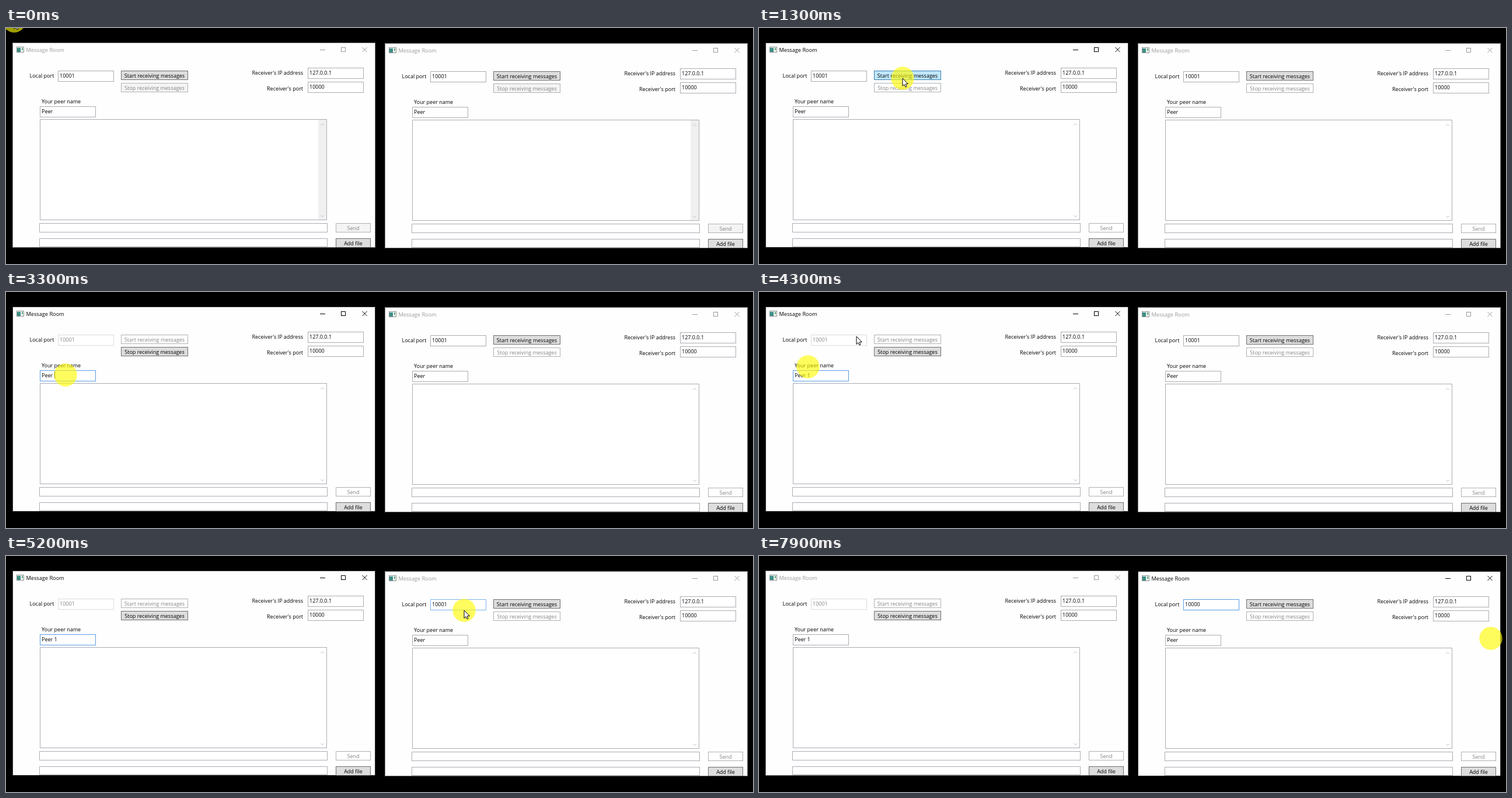
Animation, 1280 px wide and 404 px high, one loop 8000 ms. Source, as an HTML page with a canvas:

```html
<!DOCTYPE html>
<html lang="en">
<head>
<meta charset="utf-8">
<title>Message Room</title>
<style>
html, body { margin: 0; width: 100%; height: 100%; overflow: hidden; background: #000; }
canvas { display: block; }
</style>
</head>
<body>
<canvas id="stage" width="1280" height="404"></canvas>
<script>
const ctx = document.getElementById('stage').getContext('2d');
const LOOP = 8000, STEP = 100;
const GREY = '#838383', EDGE = '#abadb3', HOVER = '#7eb4ea', FOCUS = '#569de5';

// pointer stops: time, x, y
const path = [
  [0, 14, -12], [100, 14, -12], [700, 246, 86], [1500, 246, 86], [2100, 104, 142],
  [2400, 104, 142], [2600, 102, 142], [4000, 102, 142], [4100, 70, 135], [4200, 84, 128],
  [4300, 167, 76], [4500, 167, 76], [5100, 785, 93], [5200, 785, 93], [5300, 780, 87],
  [7700, 780, 87], [7800, 1254, 141], [7900, 1310, 150], [8000, 1310, 150]
];

function pointerAt(t) {
  const i = Math.max(1, path.findIndex(p => p[0] >= t));
  const [t0, x0, y0] = path[i - 1], [t1, x1, y1] = path[i];
  const u = Math.max(0, (t - t0) / (t1 - t0)), e = u * u * (3 - 2 * u);
  return [x0 + (x1 - x0) * e, y0 + (y1 - y0) * e];
}

const within = (t, ...spans) => spans.some(([a, b]) => t >= a && t < b);

function rect(x, y, w, h, fill, edge) {
  ctx.fillStyle = fill;
  ctx.fillRect(x, y, w, h);
  if (edge) {
    ctx.strokeStyle = edge;
    ctx.strokeRect(x + .5, y + .5, w - 1, h - 1);
  }
}

function text(s, x, y, color = '#000', align = 'left', size = 9) {
  ctx.font = size + 'px "Open Sans", "Noto Sans", sans-serif';
  ctx.textAlign = align;
  ctx.fillStyle = color;
  ctx.fillText(s, x, y);
}

function line(color, ...pts) {
  ctx.strokeStyle = color;
  ctx.beginPath();
  pts.forEach(([x, y]) => ctx.lineTo(x, y));
  ctx.stroke();
}

function drawWindow(ox, oy, s) {
  const [px, py] = [s.pointer[0] - ox, s.pointer[1] - oy];
  const over = (x, y, w, h) => px >= x && px <= x + w && py >= y && py <= y + h;

  function button(label, x, y, w, on) {
    const hot = on && over(x, y, w, 16);
    rect(x, y, w, 16, hot ? '#bee6fd' : on ? '#ddd' : s.early ? '#f4f4f4' : '#fff',
      hot ? '#3c7fb1' : on ? '#707070' : '#adb2b5');
    text(label, x + w / 2, y + 12, on ? '#000' : GREY, 'center');
  }

  function field(value, x, y, base, o = {}) {
    const edge = o.off ? '#d9dbde' : o.focus ? FOCUS : over(x, y, 95, 19) ? HOVER : EDGE;
    rect(x, y, 96, 19, '#fff', edge);
    text(value, x + 3, base, o.off ? GREY : '#000');
    if (o.caret) {
      const cx = Math.round(x + 3 + ctx.measureText(value).width);
      rect(cx, y + 2, 1, 12, '#000');
    }
  }

  ctx.save();
  ctx.translate(ox, oy);
  rect(11, 25, 622, 351, '#fefefe', s.active ? '#383838' : '#888');

  rect(18, 32, 13, 10, '#f4f4f4', '#8a9296');
  rect(19, 34, 6, 7, '#3f8f86');
  rect(27, 34, 2, 4, '#5aa67c');
  const ink = s.active ? '#000' : '#999';
  text('Message Room', 34.5, 41, ink, 'left', 9.2);
  line(ink, [538, 37.5], [547, 37.5]);
  ctx.strokeRect(574.5, 33.5, 7, 7);
  line(ink, [610.5, 33], [618.5, 41]);
  line(ink, [618.5, 33], [610.5, 41]);

  text('Local port', 40.5, 85);
  text("Receiver's IP address", 509, 79.5, '#000', 'right');
  text("Receiver's port", 509, 106.5, '#000', 'right');
  text('Your peer name', 61, 128.5);
  field(s.port, 89, 73, 85, { off: s.started, focus: s.portFocus, caret: s.portCaret });
  field('127.0.0.1', 517, 68, 79.5);
  field('10000', 517, 92, 103.5);
  field(s.name, 58, 134, 146, { focus: s.nameFocus, caret: s.nameCaret });
  button('Start receiving messages', 197, 73, 115, !s.started);
  button('Stop receiving messages', 197, 94, 115, s.started);

  rect(58, 156, 492, 173, '#fff', EDGE);
  if (s.early) rect(535, 157, 14, 171, '#f0f0f0');
  line('#c0c0c0', [539, 166.5], [542, 163.5], [545, 166.5]);
  line('#c0c0c0', [539, 320.5], [542, 323.5], [545, 320.5]);
  rect(57, 334, 494, 16, '#fff', EDGE);
  rect(57, 360, 494, 15, '#fff', EDGE);
  button('Send', 565, 334, 60, false);
  button('Add file', 565, 360, 60, true);
  ctx.restore();
}

function drawPointer(x, y, beam) {
  if (beam) {
    const pale = 'rgba(255,255,255,.6)';
    line(pale, [x + .5, y - 6], [x + .5, y + 7]);
    line(pale, [x - 2, y - 6.5], [x + 3, y - 6.5]);
    line(pale, [x - 2, y + 7.5], [x + 3, y + 7.5]);
    return;
  }
  const shape = [[0, 0], [0, 13.5], [3, 10.7], [5, 15], [7, 14], [5.2, 9.8], [9.3, 9.6]];
  ctx.beginPath();
  shape.forEach(([dx, dy]) => ctx.lineTo(x + dx, y + dy));
  ctx.closePath();
  ctx.fillStyle = '#fff';
  ctx.strokeStyle = '#000';
  ctx.fill();
  ctx.stroke();
}

function draw(t) {
  const pointer = pointerAt(t), halo = pointerAt(Math.max(0, t - STEP));
  const early = t < 200, second = t >= 5600;
  rect(0, 0, 1280, 404, '#000');

  drawWindow(0, 0, {
    pointer, early,
    active: t >= 1300 && !second,
    started: t >= 1400,
    port: '10001',
    name: t < 3200 ? 'Peer' : t < 3600 ? 'Peer ' : 'Peer 1',
    nameFocus: t >= 2400 && !second,
    nameCaret: within(t, [2400, 2900], [3200, 4100], [4600, 5100])
  });
  drawWindow(638, 1, {
    pointer, early,
    active: second,
    started: false,
    port: t < 6600 ? '10001' : t < 7200 ? '1000' : '10000',
    name: 'Peer',
    portFocus: second,
    portCaret: within(t, [5600, 6100], [6600, 7100], [7200, 7800])
  });

  ctx.fillStyle = 'rgba(255,250,0,.63)';
  ctx.beginPath();
  ctx.arc(halo[0], halo[1], 19.7, 0, 7);
  ctx.fill();
  if (!within(t, [3300, 4100], [7200, 7800])) {
    drawPointer(...pointer, within(t, [2100, 3300], [5300, 7200]));
  }
}

function tick() {
  draw(Math.floor(performance.now() % LOOP / STEP) * STEP);
  requestAnimationFrame(tick);
}
tick();
</script>
</body>
</html>
```
